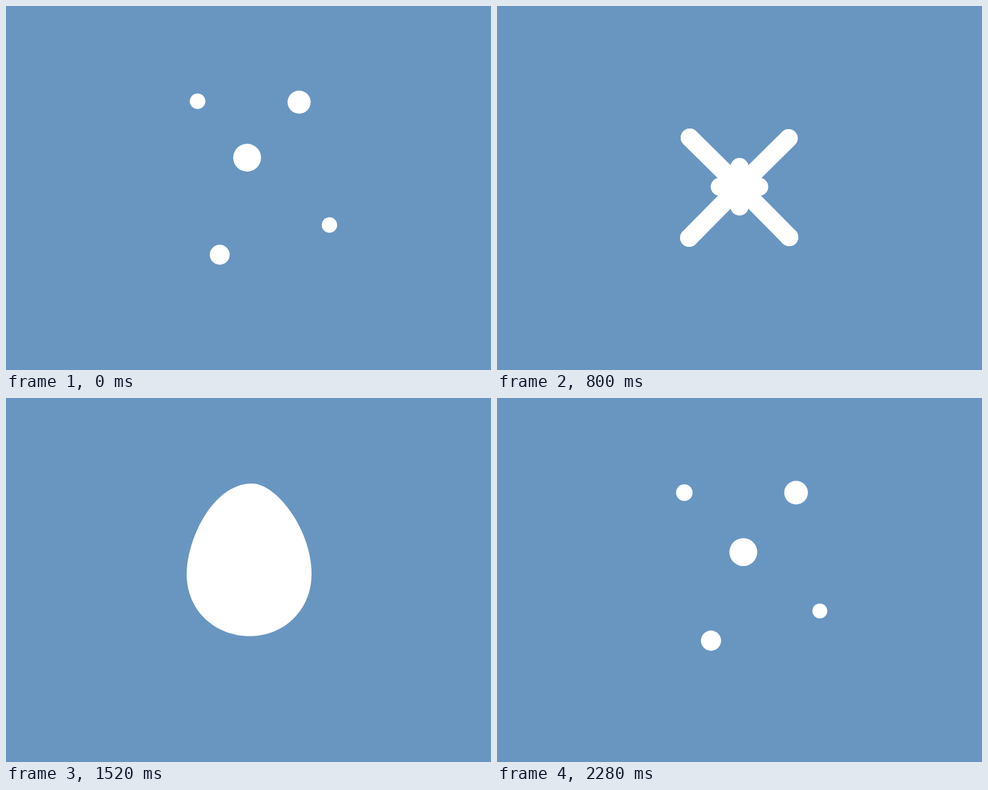
An HTML page with a canvas that plays this animation: 800x600 px, repeating every 2320 ms.

```html
<!DOCTYPE html>
<html lang="en">
<head>
<meta charset="utf-8">
<title>Snow loop</title>
<style>
  html, body { margin: 0; height: 100%; overflow: hidden; background: #6996c1; }
  canvas { display: block; }
</style>
</head>
<body>
<canvas id="stage" width="800" height="600"></canvas>
<script>
const ctx = document.getElementById('stage').getContext('2d');
const LOOP = 2320, STEP = 40, FLOOR = 484, CX = 400, CY = 298;
const HIT = 1640, CROWN = 1800, BREAK = 1960, JOIN = LOOP + 600;

const clamp = v => Math.max(0, Math.min(1, v));
const span = (t, a, b) => clamp((t - a) / (b - a));
const smooth = p => p * p * (3 - 2 * p);
const mix = (a, b, p) => a + (b - a) * p;

// Drops leave the floor at HIT and land on their flake tip at JOIN, in the next loop.
const pathTimes = [HIT, CROWN, BREAK, LOOP - STEP, LOOP, 2560, 2840, JOIN];
const sizeTimes = [HIT, CROWN, BREAK, LOOP - STEP / 2, 2840, JOIN];
const drop = (x, y, r, tip, foot, pull = 0, tilt = 0) => ({
  x: [mix(CX, x[0], .8), ...x, tip[0]],
  y: [FLOOR - 14, ...y, tip[1]],
  r: [r[0] / 2, ...r, 15.2, 15],
  tip, foot, pull, tilt
});
const drops = [
  drop([266, 261, 309, 316, 333, 321.5], [374, 234, 156, 157, 179, 213], [25, 24.7, 13.2], [318, 217], 276, .06),
  drop([545, 547, 493.3, 483.5, 460, 487], [383, 236, 156, 158.5, 188, 220.5], [23, 24, 19.3], [481, 218], 533, .14),
  drop([486, 485, 406.3, 397.7, 377, 393.5], [405, 319, 254, 250, 263, 302], [16, 20.5, 23], [400, 298], 480, .09, .8),
  drop([325, 324.5, 353, 352.5, 332, 313.5], [413, 373, 400, 410, 428, 384.5], [14, 18.7, 16.5], [317, 382], 324, .02),
  drop([495, 500, 532.5, 533.5, 514, 480.5], [476, 465, 351, 361, 395, 388], [5, 8, 12.5], [482, 381], 495)
];

// Smooth curve through uneven keys; short intervals weigh more in the slope.
function spline(times, values, t) {
  const last = times.length - 1;
  let i = 0;
  while (i < last - 1 && t >= times[i + 1]) i++;
  const gap = k => times[k + 1] - times[k];
  const rise = k => (values[k + 1] - values[k]) / gap(k);
  const slope = k => k === 0 ? rise(0) : k === last ? rise(last - 1)
    : (rise(k - 1) * gap(k) + rise(k) * gap(k - 1)) / (gap(k - 1) + gap(k));
  const h = gap(i), p = clamp((t - times[i]) / h), q = 1 - p;
  return mix(values[i], values[i + 1], smooth(p)) + h * p * q * (slope(i) * q - slope(i + 1) * p);
}

function line(x1, y1, x2, y2, w = 30) {
  ctx.lineWidth = w;
  ctx.beginPath();
  ctx.moveTo(x1, y1);
  ctx.lineTo(x2, y2);
  ctx.stroke();
}

function oval(x, y, rx, ry = rx, turn = 0) {
  ctx.beginPath();
  ctx.ellipse(x, y, rx, ry, turn, 0, Math.PI * 2);
  ctx.fill();
}

function flake(diag, cross, twig, size, w) {
  ctx.save();
  ctx.translate(CX, CY);
  for (const { tip } of drops) {
    const x = (tip[0] - CX) * size, y = (tip[1] - CY) * size;
    line(0, 0, x * diag, y * diag, w);
    oval(x, y, w / 2);
  }
  for (let i = 0; i < 4; i++) {
    if (cross > 0) line(0, 0, 0, -163.5 * cross * size, w);
    if (twig > 0) for (const side of [-1, 1])
      line(0, -89 * size, 37.7 * side * twig * size, (-89 - 37.7 * twig) * size, w);
    ctx.rotate(Math.PI / 2);
  }
  ctx.restore();
}

function egg(scale, dy, sx) {
  ctx.save();
  ctx.beginPath();
  ctx.rect(0, 0, 800, FLOOR - 1);
  ctx.clip();
  ctx.translate(401, 280 + dy);
  ctx.scale(scale * sx, scale);
  ctx.translate(-401, -280);
  ctx.beginPath();
  ctx.moveTo(406, 141);
  ctx.bezierCurveTo(446, 141, 504, 217, 504, 290);
  ctx.bezierCurveTo(504, 350, 458, 392.5, 402, 392.5);
  ctx.bezierCurveTo(346, 392.5, 298, 352, 298, 290);
  ctx.bezierCurveTo(298, 235, 340, 141, 406, 141);
  ctx.fill();
  ctx.restore();
}

// Liquid on the floor: a slab with three swells, from crown (flat 0) to puddle (flat 1).
function mound(flat, sx, sy) {
  const m = (a, b) => mix(a, b, flat);
  const left = m(252, 234), right = m(559, 564), waist = m(13, 0), lip = m(16, 5);
  const swells = [
    [m(266, 323), m(45, 22), m(29, 42)],
    [392, m(50, 0), 42],
    [m(537, 495), m(40, 25), m(15, 48)]
  ];
  const top = x => swells.reduce(
    (y, [at, high, wide]) => y - high * Math.exp(-(Math.abs((x - at) / wide) ** 2.9)), -m(52, 7));
  ctx.save();
  ctx.translate(CX, FLOOR);
  ctx.scale(sx, sy);
  ctx.translate(-CX, 0);
  ctx.beginPath();
  ctx.moveTo(left, -lip);
  for (let x = left + waist; x <= right - waist; x += 2) ctx.lineTo(x, top(x));
  ctx.quadraticCurveTo(right - waist, -lip * 2, right, -lip);
  ctx.bezierCurveTo(right - 20, lip / 3, left - 5, lip / 3, left, -lip);
  ctx.fill();
  ctx.restore();
}

function drawDrops(t) {
  const stretch = 1 - smooth(span(t, BREAK, 2200));
  const neck = 1 - span(t, CROWN, 1920);
  for (const d of drops) {
    const x = spline(pathTimes, d.x, t), y = spline(pathTimes, d.y, t);
    const r = spline(sizeTimes, d.r, t), pull = d.pull * stretch;
    oval(x, y, r * (1 - pull), r * (1 + pull), d.tilt);
    if (neck > 0) line(mix(x, d.foot, span(t, HIT, CROWN)), Math.max(y, 445), x, y, r * 1.35 * neck);
  }
}

function drawSplash(t) {
  const rise = Math.sin(span(t, HIT, CROWN) * Math.PI / 2);
  const dry = smooth(span(t, BREAK, 2120));
  if (dry < 1) mound(smooth(span(t, CROWN, BREAK)), mix(.75, 1, rise) * (1 - dry / 2), rise * (1 - dry));
  drawDrops(t);
}

function drawFlake(t) {
  flake(smooth(span(t, 600, 800)), smooth(span(t, 720, 1000)), smooth(span(t, 920, 1120)), 1, 30);
}

function drawEgg(t) {
  const melt = smooth(span(t, 1160, 1480));
  if (melt < 1) flake(1, 1, 1, 1 - .65 * melt, 30 + 40 * melt);
  const s = Math.max(0, t - 1520) / STEP;
  egg(smooth(span(t, 1160, 1520)), 20 * s + 3 * s * s, 1 - .2 * span(t, HIT, CROWN));
}

function draw(t) {
  ctx.fillStyle = '#6996c1';
  ctx.fillRect(0, 0, 800, 600);
  ctx.fillStyle = ctx.strokeStyle = '#fff';
  ctx.lineCap = 'round';
  if (t < 600) drawDrops(t + LOOP);
  else if (t < 1160) drawFlake(t);
  else if (t < CROWN) drawEgg(t);
  if (t > HIT) drawSplash(t);
}

const start = performance.now();
function tick(now) {
  draw(Math.floor(Math.max(0, now - start) % LOOP / STEP) * STEP);
  requestAnimationFrame(tick);
}
tick(start);
</script>
</body>
</html>
```
